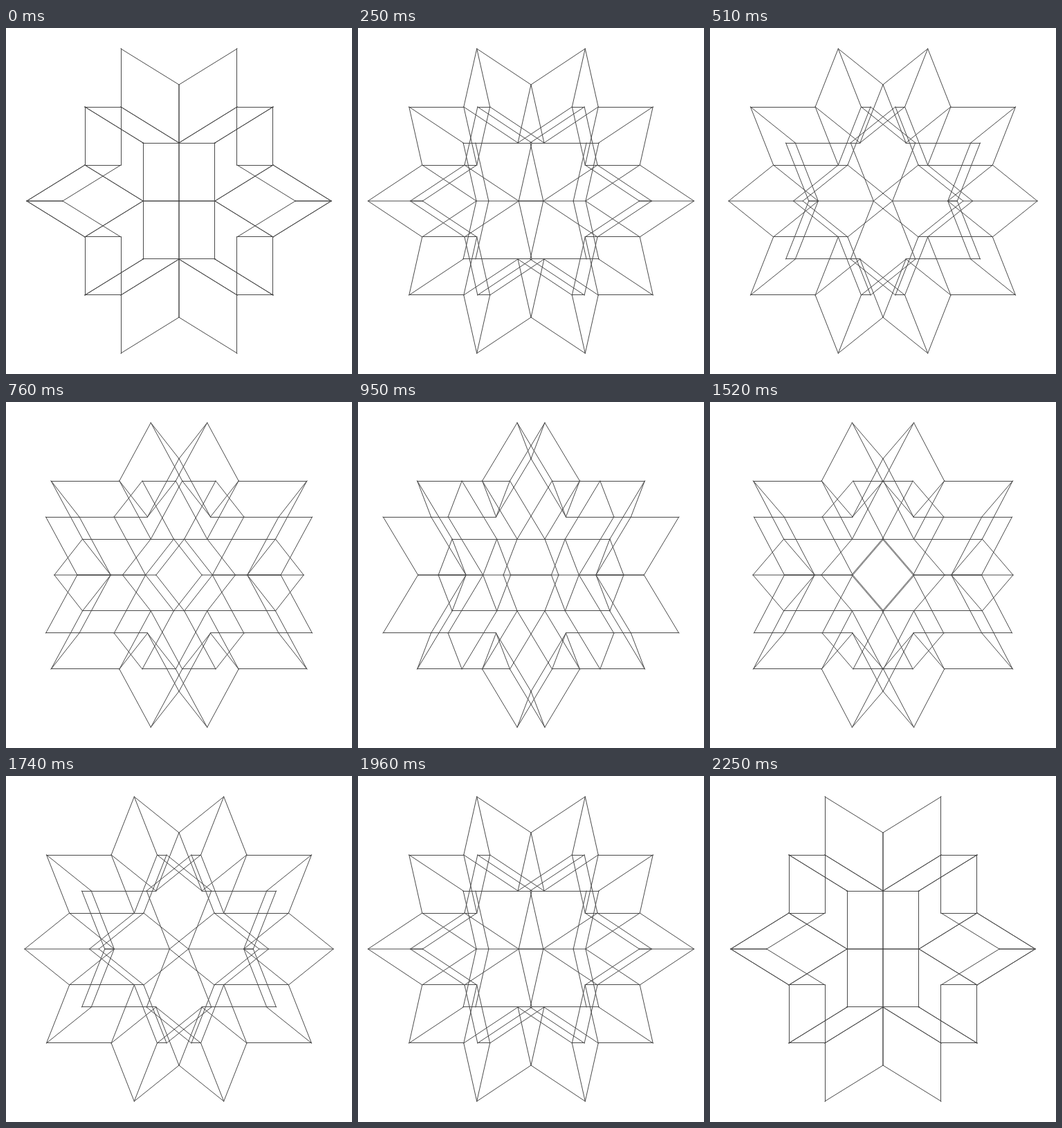
These frames come from a looping animation (500x500 px, 2280 ms). An HTML page:

```html
<!DOCTYPE html>
<html lang="en">
<head>
<meta charset="utf-8">
<title>Rotating rhombic hexecontahedron</title>
<style>
  html, body { margin: 0; width: 100%; height: 100%; overflow: hidden; background: #fff; }
  svg { display: block; width: 100vw; height: 100vh; }
  path { fill: none; stroke: #4a4a4a; stroke-width: 1; stroke-linecap: round; }
</style>
</head>
<body>
<svg viewBox="0 0 500 500"><path id="wire"/></svg>
<script>
const PHI = (1 + Math.sqrt(5)) / 2;
const UNIT = 136;
const CENTER = 250;
const STEPS = 60;
const LOOP = 2280;

// All sign changes and cyclic shifts of one point
function orbit(point) {
  const found = new Map();
  for (let shift = 0; shift < 3; shift++) {
    for (let signs = 0; signs < 8; signs++) {
      const p = [0, 1, 2].map(i => {
        const v = point[(i + shift) % 3] * UNIT;
        return v && (signs >> i) & 1 ? -v : v;
      });
      found.set(p.map(v => v.toFixed(2)).join(), p);
    }
  }
  return [...found.values()];
}

const a = 1 / PHI, b = a / PHI;
const outer = [...orbit([1, 1, 1]), ...orbit([a, PHI, 0])];
const middle = [...orbit([0, 2 * a, 0]), ...orbit([a, 1, b])];
const inner = orbit([0, a, b]);

// Every edge of the solid has the same length
const edgeLength = UNIT * Math.hypot(a, b);
const edges = [];
for (const m of middle) {
  for (const p of [...outer, ...inner]) {
    const d = Math.hypot(m[0] - p[0], m[1] - p[1], m[2] - p[2]);
    if (Math.abs(d - edgeLength) < 0.1) edges.push([m, p]);
  }
}

// Sharp pixel line, symmetric about the center
const snap = v => Math.sign(v) * Math.max(0, Math.round(Math.abs(v)) - 0.5);

function segment(p, q, cos, sin) {
  const project = v => [v[0] * cos + v[2] * sin, -v[1]];
  const [x1, y1] = project(p), [x2, y2] = project(q);
  const flatX = Math.abs(x1 - x2) < 0.01, flatY = Math.abs(y1 - y2) < 0.01;
  if (flatX && flatY) return "";
  const fx = v => (CENTER + (flatX ? snap(v) : v)).toFixed(2);
  const fy = v => (CENTER + (flatY ? snap(v) : v)).toFixed(2);
  return `M${fx(x1)} ${fy(y1)}L${fx(x2)} ${fy(y2)}`;
}

// Five poses per 190 ms; the third one is held for 70 ms
function stepAt(ms) {
  const t = ms % LOOP;
  const r = t % 190;
  const pose = r < 60 ? Math.floor(r / 30) : r < 130 ? 2 : r < 160 ? 3 : 4;
  return Math.floor(t / 190) * 5 + pose;
}

const wire = document.getElementById("wire");
let shown = -1;

function draw(ms) {
  const step = stepAt(ms);
  if (step === shown) return;
  shown = step;
  const angle = Math.PI * step / (STEPS - 1);
  const cos = Math.cos(angle), sin = Math.sin(angle);
  wire.setAttribute("d", edges.map(([p, q]) => segment(p, q, cos, sin)).join(""));
}

const start = performance.now();
function tick() {
  draw(performance.now() - start);
  requestAnimationFrame(tick);
}
tick();
</script>
</body>
</html>
```
